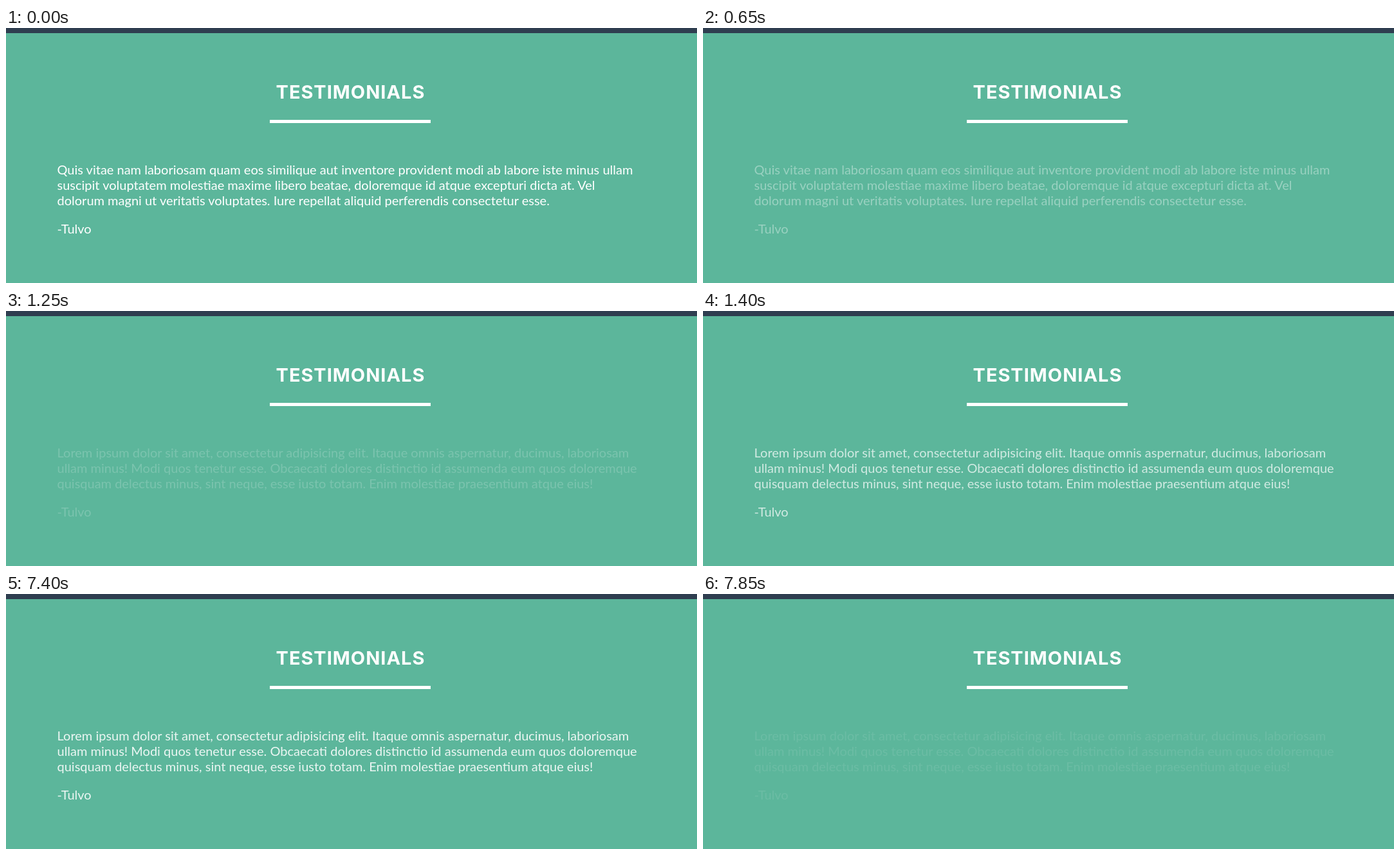
An HTML page for the animation above (8000 ms loop, 1074x397 px).

```html
<!DOCTYPE html>
<html lang="en">
<head>
<meta charset="utf-8">
<title>Testimonials</title>
<style>
  html, body { margin: 0; width: 100%; height: 100%; overflow: hidden; background: #5cb69b; }
  svg { display: block; width: 1074px; height: 397px; }
  text { fill: #fff; white-space: pre; }
  .title {
    font: 700 29px Inter, sans-serif;
    font-optical-sizing: none;
    letter-spacing: 1px;
    text-anchor: middle;
  }
  .quote { font: 400 20px Lato, sans-serif; }
</style>
</head>
<body>
<svg viewBox="0 0 1074 397">
  <rect width="1074" height="397" fill="#5cb69b"/>
  <rect width="1074" height="8" fill="#2f3e50"/>
  <text class="title" x="535.5" y="110">TESTIMONIALS</text>
  <rect x="410" y="143" width="250" height="5" fill="#fff"/>
  <g class="quote">
    <text x="79.5" y="228">Quis vitae nam laboriosam quam eos similique aut inventore provident modi ab labore iste minus ullam</text>
    <text x="79.5" y="252">suscipit voluptatem molestiae maxime libero beatae, doloremque id atque excepturi dicta at. Vel</text>
    <text x="79.5" y="276">dolorum magni ut veritatis voluptates. Iure repellat aliquid perferendis consectetur esse.</text>
    <text x="79.5" y="320">-Tulvo</text>
  </g>
  <g class="quote" opacity="0">
    <text x="79.5" y="228">Lorem ipsum dolor sit amet, consectetur adipisicing elit. Itaque omnis aspernatur, ducimus, laboriosam</text>
    <text x="79.5" y="252">ullam minus! Modi quos tenetur esse. Obcaecati dolores distinctio id assumenda eum quos doloremque</text>
    <text x="79.5" y="276">quisquam delectus minus, sint neque, esse iusto totam. Enim molestiae praesentium atque eius!</text>
    <text x="79.5" y="320">-Tulvo</text>
  </g>
</svg>
<script>
  const LOOP = 8000, STEP = 150, FIRST = 500;
  const [first, second] = document.querySelectorAll('g.quote');

  // Eased 0..1 progress of a fade
  const swing = (t, start, duration) => {
    const p = Math.min(1, Math.max(0, (t - start) / duration));
    return 0.5 - Math.cos(p * Math.PI) / 2;
  };

  // The fades advance in visible steps
  const snap = t => t < FIRST ? 0 : FIRST + Math.floor((t - FIRST) / STEP) * STEP;

  const start = performance.now();

  function draw() {
    const t = snap((performance.now() - start) % LOOP);
    first.setAttribute('opacity', 1 - swing(t, 200, 777));
    second.setAttribute('opacity', swing(t, 1130, 420) * (1 - swing(t, 7225, 777)));
    requestAnimationFrame(draw);
  }
  draw();
</script>
</body>
</html>
```
